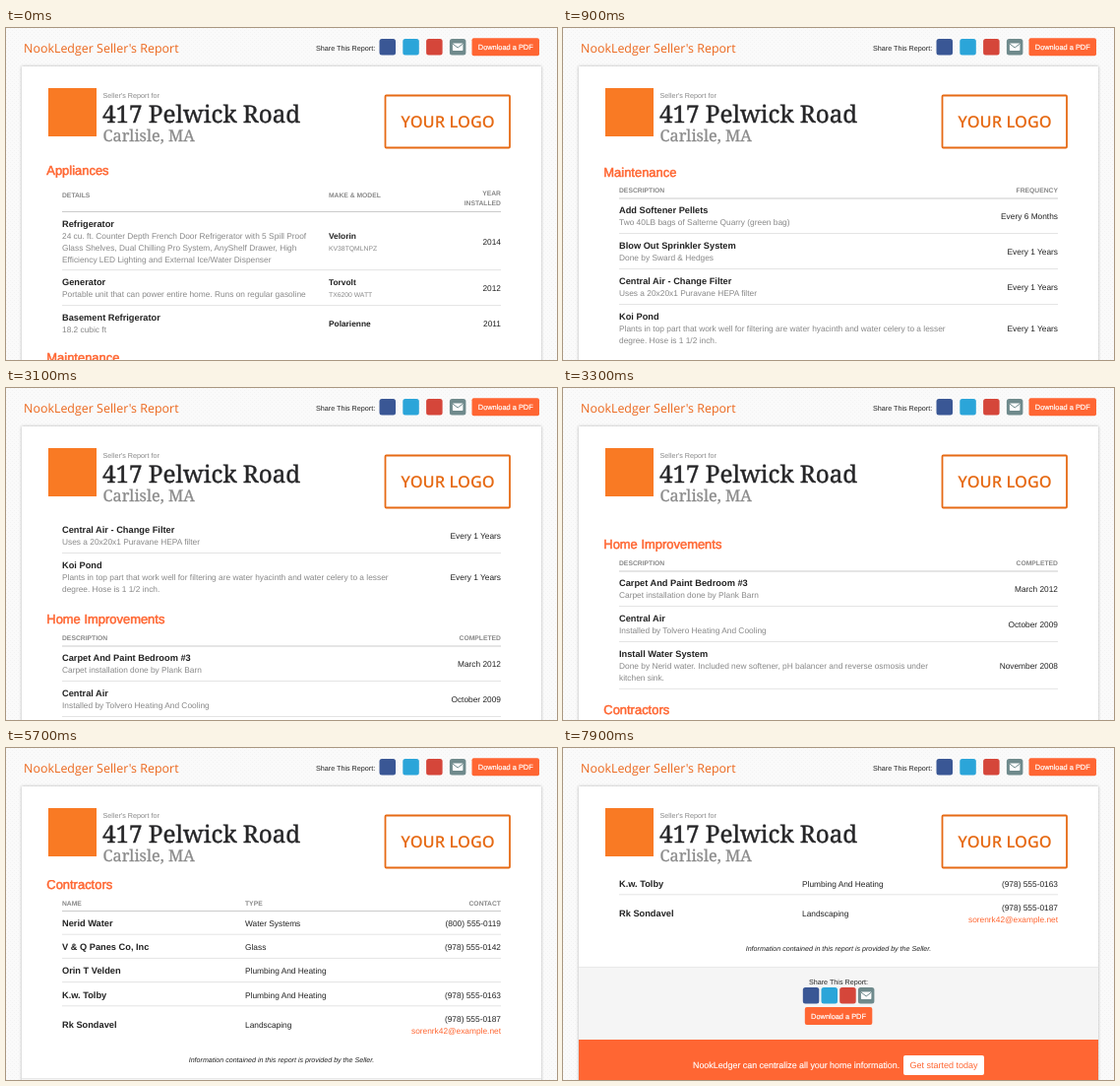
An HTML page that plays this animation: 560 by 337 pixels, repeating every 8000 ms.

```html
<!DOCTYPE html>
<html lang="en">
<head>
<meta charset="utf-8">
<title>Seller's Report</title>
<style>
  html, body { margin: 0; width: 100%; height: 100%; overflow: hidden; background: #f9f9f9; }
  svg { display: block; width: 100%; height: 100%; }
  text { font-family: "Liberation Sans", Arial, sans-serif; font-size: 8.36px; fill: #222; text-rendering: geometricPrecision; }
  .brand { font: 12.45px "Open Sans", sans-serif; fill: #ec671c; }
  .logo { font: 600 16.4px "Open Sans", sans-serif; fill: #e66a14; text-anchor: middle; }
  .street { font: 24.2px "Noto Serif", serif; fill: #252527; stroke: #252527; stroke-width: .4px; }
  .town { font: 16.3px "Noto Serif", serif; fill: #8b8b8b; stroke: #8b8b8b; stroke-width: .3px; }
  .small { font-size: 7.2px; }
  .muted, .note, .model, .th { fill: #888; }
  .heading { font-size: 12.95px; fill: #ff6530; stroke: #ff6530; stroke-width: .5px; }
  .th { font-size: 6.75px; font-weight: bold; }
  .name { font-size: 9.25px; font-weight: bold; }
  .make { font-weight: bold; }
  .model { font-size: 6.8px; }
  .mail { fill: #ff6530; }
  .button { font-size: 7.4px; fill: #fff; stroke: #fff; stroke-width: .2px; }
  .info { font-size: 7.1px; font-style: italic; }
  .pitch { font-size: 8.9px; fill: #fff; stroke: #fff; stroke-width: .15px; }
  .start { font-size: 9px; fill: #ff6530; }
  .card { filter: drop-shadow(0 0 1.5px rgba(0, 0, 0, .3)); }
</style>
</head>
<body>
<svg viewBox="0 0 560 337" preserveAspectRatio="none">
  <defs>
    <pattern id="paper" width="4" height="4" patternUnits="userSpaceOnUse">
      <rect width="4" height="4" fill="#fafafa"/>
      <path d="M0 0h1v1h-1zM2 2h1v1h-1z" fill="#f3f3f3"/>
    </pattern>
    <clipPath id="window"><rect x="16" y="134" width="528" height="203"/></clipPath>
  </defs>
  <rect width="560" height="337" fill="url(#paper)"/>
  <text class="brand" x="18" y="24.5">NookLedger Seller's Report</text>
  <g id="top"></g>
  <rect class="card" x="16" y="39" width="528" height="320" fill="#fff"/>
  <rect x="43" y="61" width="49" height="49" fill="#f97a24"/>
  <text class="small muted" x="98.5" y="71.3">Seller's Report for</text>
  <text class="street" x="98" y="95.5">417 Pelwick Road</text>
  <text class="town" x="98.5" y="114.5">Carlisle, MA</text>
  <rect x="385.5" y="68.5" width="126.5" height="53" rx="1" fill="#fff" stroke="#e66a14" stroke-width="1.8"/>
  <text class="logo" x="449" y="101">YOUR LOGO</text>
  <g clip-path="url(#window)"><g id="sheet"></g></g>
</svg>
<script>
const ORANGE = '#ff6633';
const topBar = document.getElementById('top');
const sheet = document.getElementById('sheet');

function add(parent, tag, attrs, content = '') {
  const node = document.createElementNS('http://www.w3.org/2000/svg', tag);
  for (const key in attrs) node.setAttribute(key, attrs[key]);
  node.textContent = content;
  parent.append(node);
  return node;
}

const text = (parent, cls, x, y, content, anchor = 'start') =>
  add(parent, 'text', { class: cls, x, y, 'text-anchor': anchor }, content);

const box = (parent, x, y, width, height, fill, rx = 0) =>
  add(parent, 'rect', { x, y, width, height, fill, rx });

const section = scroll => add(sheet, 'g', { transform: `translate(0 ${scroll})` });

function shareIcons(parent, x, y, gap) {
  ['#3a5795', '#2ba5d9', '#d5463a', '#6f8a8c'].forEach((color, i) =>
    box(parent, x + i * gap, y, 16.5, 16.5, color, 2.5));
  const left = x + 3 * gap + 3;
  box(parent, left, y + 4.5, 10.5, 7.5, '#fff', .8);
  add(parent, 'path', { d: `M${left} ${y + 5}l5.25 4l5.25 -4`, fill: 'none', stroke: '#6f8a8c' });
}

function downloadButton(parent, x, y) {
  box(parent, x, y, 68.5, 18, ORANGE, 2);
  text(parent, 'button', x + 34.25, y + 11.7, 'Download a PDF', 'middle');
}

// Each cell is a list of lines, centred vertically in its row.
function table(scroll, title, titleY, headY, top, columns, rows, closed = false) {
  const group = section(scroll);
  const rule = (y, color) => box(group, 57, y, 446, 1, color);
  text(group, 'heading', 41.3, titleY + 4, title);
  for (const { x, anchor, label } of columns) {
    const lines = label.split('|');
    lines.forEach((line, i) =>
      text(group, 'th', x, headY + 2.3 + (lines.length > 1 ? i * 10 - 2 : 0), line, anchor));
  }
  rule(top + .5, '#cbcbcb');
  rows.forEach((row, r) => {
    const height = 24.2 + 11.8 * (Math.max(...row.map(cell => cell.length)) - 1);
    row.forEach((cell, c) => {
      const { x, anchor, styles } = columns[c];
      cell.forEach((line, i) => {
        const y = top + height / 2 + (i - (cell.length - 1) / 2) * 12 + 4.3;
        text(group, styles[Math.min(i, styles.length - 1)], x, y, line, anchor);
      });
    });
    top += height;
    if (closed || r < rows.length - 1) rule(top, '#e4e4e4');
  });
}

const first = label => ({ x: 57, label, styles: ['name', 'note'] });
const last = (label, ...styles) => ({ x: 503, anchor: 'end', label, styles: ['value', ...styles] });

text(topBar, 'small', 315, 22.5, 'Share This Report:');
shareIcons(topBar, 379.5, 11, 23.8);
downloadButton(topBar, 473.5, 10.2);

table(0, 'Appliances', 145, 170, 185.5,
  [first('DETAILS'), { x: 328, label: 'MAKE & MODEL', styles: ['make', 'model'] }, last('YEAR|INSTALLED')],
  [
    [['Refrigerator',
      '24 cu. ft. Counter Depth French Door Refrigerator with 5 Spill Proof',
      'Glass Shelves, Dual Chilling Pro System, AnyShelf Drawer, High',
      'Efficiency LED Lighting and External Ice/Water Dispenser'], ['Velorin', 'KV38TQMLNPZ'], ['2014']],
    [['Generator', 'Portable unit that can power entire home. Runs on regular gasoline'],
      ['Torvolt', 'TX6200 WATT'], ['2012']],
    [['Basement Refrigerator', '18.2 cubic ft'], ['Polarienne'], ['2011']]
  ]);

table(188, 'Maintenance', 147, 165, 172, [first('DESCRIPTION'), last('FREQUENCY')], [
  [['Add Softener Pellets', 'Two 40LB bags of Salterne Quarry (green bag)'], ['Every 6 Months']],
  [['Blow Out Sprinkler System', 'Done by Sward & Hedges'], ['Every 1 Years']],
  [['Central Air - Change Filter', 'Uses a 20x20x1 Puravane HEPA filter'], ['Every 1 Years']],
  [['Koi Pond',
    'Plants in top part that work well for filtering are water hyacinth and water celery to a lesser',
    'degree. Hose is 1 1/2 inch.'], ['Every 1 Years']]
]);

table(377, 'Home Improvements', 159, 177.7, 185, [first('DESCRIPTION'), last('COMPLETED')], [
  [['Carpet And Paint Bedroom #3', 'Carpet installation done by Plank Barn'], ['March 2012']],
  [['Central Air', 'Installed by Tolvero Heating And Cooling'], ['October 2009']],
  [['Install Water System',
    'Done by Nerid water. Included new softener, pH balancer and reverse osmosis under',
    'kitchen sink.'], ['November 2008']]
], true);

table(565, 'Contractors', 139, 157.5, 164.5,
  [first('NAME'), { x: 243, label: 'TYPE', styles: ['value'] }, last('CONTACT', 'mail')],
  [
    [['Nerid Water'], ['Water Systems'], ['(800) 555-0119']],
    [['V & Q Panes Co, Inc'], ['Glass'], ['(978) 555-0142']],
    [['Orin T Velden'], ['Plumbing And Heating'], []],
    [['K.w. Tolby'], ['Plumbing And Heating'], ['(978) 555-0163']],
    [['Rk Sondavel'], ['Landscaping'], ['(978) 555-0187', 'sorenrk42@example.net']]
  ]);

const footer = section(678);
text(footer, 'info', 280, 206, 'Information contained in this report is provided by the Seller.', 'middle');
box(footer, 16, 222, 528, 74, '#f5f5f5');
box(footer, 16, 222, 528, 1, '#e9e9e9');
text(footer, 'small', 280, 240, 'Share This Report:', 'middle');
shareIcons(footer, 243.8, 243, 18.7);
downloadButton(footer, 245.8, 263);
box(footer, 16, 296, 528, 60, ORANGE);
text(footer, 'pitch', 132, 324.5, 'NookLedger can centralize all your home information.');
box(footer, 346, 312, 82, 20, '#fff', 2);
text(footer, 'start', 387, 325.3, 'Get started today', 'middle');

// Scrolls advance in hard steps, one every 100 ms.
const LOOP = 8000, TICK = 100;
const scrolls = [
  { start: 500, steps: 5, from: 0, to: 188 },
  { start: 2900, steps: 5, from: 188, to: 377 },
  { start: 5300, steps: 5, from: 377, to: 565 },
  { start: 7700, steps: 3, from: 565, to: 678 }
];
const pose = (time, y) => ({
  offset: time / LOOP, transform: `translateY(${-Math.round(y)}px)`, easing: 'steps(1, end)'
});
const poses = [pose(0, 0)];
for (const { start, steps, from, to } of scrolls)
  for (let i = 0; i < steps; i++)
    poses.push(pose(start + i * TICK, from + (to - from) * (i + 1) / steps));
poses.push(pose(LOOP, 678));
sheet.animate(poses, { duration: LOOP, iterations: Infinity });
</script>
</body>
</html>
```
